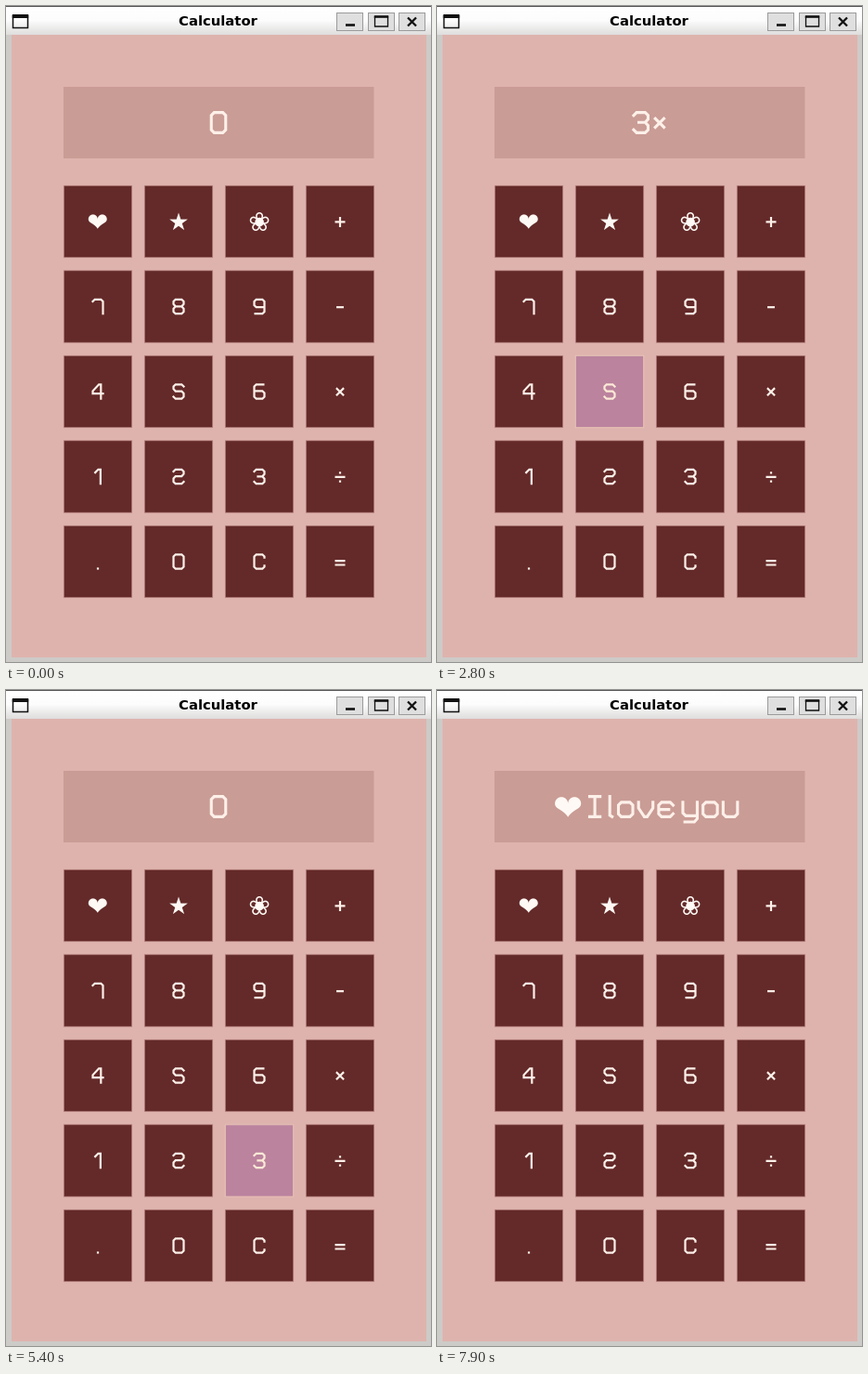
These frames come from a looping animation (458 by 706 pixels, 8000 ms). An HTML page:

```html
<!DOCTYPE html>
<html lang="en">
<head>
<meta charset="utf-8">
<title>Calculator</title>
<style>
  html, body { margin: 0; width: 100%; height: 100%; overflow: hidden; background: #deb3ae; }
  svg { display: block; width: 458px; height: 706px; }
  .title { font: bold 14.8px "DejaVu Sans", sans-serif; text-anchor: middle; }
  .symbol { font-family: "DejaVu Sans", sans-serif; fill: #fff9f5; }
  .glyph { fill: none; stroke: #fdf0e9; stroke-linecap: square; }
  .key rect { fill: #632a29; stroke: #b98480; stroke-width: .7; }
  .key.hover rect { fill: #bb839e; stroke: #e8c3b4; stroke-width: 1; }
  .key.hover .glyph { stroke: #fbe9d6; }
</style>
</head>
<body>
<svg id="stage" viewBox="0 0 458 706" xmlns="http://www.w3.org/2000/svg">
  <defs>
    <linearGradient id="bar" x2="0" y2="1">
      <stop offset="0" stop-color="#fff"/>
      <stop offset=".5" stop-color="#fcfcfc"/>
      <stop offset="1" stop-color="#dedddc"/>
    </linearGradient>
  </defs>
  <rect width="458" height="706" fill="#cdcbc8"/>
  <rect x="6" y="31" width="447" height="670" fill="#deb3ae"/>
  <rect width="458" height="31" fill="url(#bar)"/>
  <path d="M0 .5H458" stroke="#555"/>
  <text class="title" x="228.5" y="21">Calculator</text>
  <g fill="none" stroke="#111" stroke-width="1.5">
    <path d="M7.5 10V23.5H23.5V10"/>
    <path d="M6.8 11H24.2" stroke-width="4"/>
  </g>
  <g fill="#dfdfdf" stroke="#9b9b9b">
    <rect x="356.5" y="7.5" width="28" height="19"/>
    <rect x="390.5" y="7.5" width="28" height="19"/>
    <rect x="423.5" y="7.5" width="28" height="19"/>
  </g>
  <g fill="none" stroke="#111">
    <path d="M366 20.5H376" stroke-width="2.6"/>
    <path d="M397.5 11V22H411.5V11" stroke-width="1.3"/>
    <path d="M396.8 11.5H412.2" stroke-width="2.6"/>
    <path d="M433 12.5L442 21.5M442 12.5L433 21.5" stroke-width="2.3"/>
  </g>
  <rect x="62" y="87" width="334.5" height="77" fill="#c99c95"/>
  <g id="keys"></g>
  <g id="display"></g>
</svg>
<script>
const LOOP = 8000;
const BUTTON_UNIT = 2.2, DISPLAY_UNIT = 3.1, SPACE = 1.4;
const HEART = '❤', MESSAGE = HEART + ' I love you';

// Strokes on a grid eight units tall: [width, path]
const LOWER_O = 'M1.5 2.5H4.5L5.5 3.5V6.5L4.5 7.5H1.5L.5 6.5V3.5Z';
const GLYPHS = {
  0: [6, 'M1.5 .5H4.5L5.5 1.5V6.5L4.5 7.5H1.5L.5 6.5V1.5Z'],
  1: [3.6, 'M.5 2L2 .5H3.1V7.5'],
  2: [6, 'M.5 1.5L1.5 .5H4.5L5.5 1.5V2.7L4.5 3.8H1.5L.5 4.9V6.5L1.5 7.5H4.5L5.5 6.5'],
  3: [6, 'M.5 1.5L1.5 .5H4.5L5.5 1.5V2.8L4.5 3.9H2.3M4.5 3.9L5.5 5V6.5L4.5 7.5H1.5L.5 6.5'],
  4: [6, 'M4.5 7.5V.5H3.5L.5 3.7V5H5.5'],
  5: [6, 'M5.5 1.5L4.5 .5H1.5L.5 1.5V2.7L1.5 3.8H4.5L5.5 4.9V6.5L4.5 7.5H1.5L.5 6.5'],
  6: [6, 'M5 .5H1.5L.5 1.5V6.5L1.5 7.5H4.5L5.5 6.5V4.7L4.5 3.7H.5'],
  7: [6, 'M.5 1.5L1.5 .5H4.5L5.5 1.5V7.5'],
  8: [6, 'M1.5 .5H4.5L5.5 1.5V2.8L4.5 3.9H1.5L.5 2.8V1.5ZM1.5 3.9L.5 5V6.5L1.5 7.5H4.5L5.5 6.5V5L4.5 3.9'],
  9: [6, 'M5.5 4.3H1.5L.5 3.3V1.5L1.5 .5H4.5L5.5 1.5V6.5L4.5 7.5H1'],
  C: [6, 'M5.5 2V1.5L4.5 .5H1.5L.5 1.5V6.5L1.5 7.5H4.5L5.5 6.5V6'],
  '.': [1, 'M.5 7.4h.01'],
  '+': [5, 'M.5 4.2H4.5M2.5 2.2V6.2'],
  '-': [3.6, 'M.5 4.3H3.1'],
  '×': [5, 'M1 2.6L4 5.6M4 2.6L1 5.6'],
  '÷': [5, 'M.5 4.2H4.5M2.5 2.1h.01M2.5 6.3h.01'],
  '=': [5, 'M.5 3.6H4.5M.5 5.6H4.5'],
  I: [4.6, 'M.5 .5H4.1M2.3 .5V7.5M.5 7.5H4.1'],
  l: [2, 'M.5 .5V7L1.3 7.5'],
  o: [6, LOWER_O],
  v: [6, 'M.5 2.5V4.5L2.5 7.5H3.5L5.5 4.5V2.5'],
  e: [6, 'M5.5 3.5L4.5 2.5H1.5L.5 3.5V6.5L1.5 7.5H4.5L5.5 6.5M1 5H4'],
  y: [6, 'M.5 2.5V6.2L1.5 7.2H5.5M5.5 2.5V8.2L4.5 9.3H1.2'],
  u: [6, 'M.5 2.5V6.5L1.5 7.5H4.5L5.5 6.5V2.5']
};
const SYMBOL_WIDTH = { [HEART]: 9.2, '★': 9.1, '❀': 9.5 };

const ROWS = [[HEART, '★', '❀', '+'], '789-', '456×', '123÷', '.0C='];

// [time, value] pairs; each value holds until the next
const HOVERS = [
  [0, ''], [800, '0'], [900, '2'], [1200, '3'], [2050, '6'], [2200, '×'],
  [2600, '6'], [2750, '5'], [2900, '4'], [3400, '2'], [3500, 'C'], [3600, '='],
  [4800, 'C'], [5400, '3'], [5500, '6'], [5650, '5'], [5750, '8'], [5850, '7'],
  [5950, HEART], [7000, '']
];
const READINGS = [
  [0, '0'], [1600, '3'], [2400, '3×'], [3100, '3×4'], [4100, '12'], [5100, '0']
];
const TYPING_START = 6600, TYPING_STEP = 100;

const pen = document.createElement('canvas').getContext('2d');

function make(tag, attributes, parent) {
  const node = document.createElementNS('http://www.w3.org/2000/svg', tag);
  for (const name in attributes) node.setAttribute(name, attributes[name]);
  parent.append(node);
  return node;
}

// Picks the font size that gives the ink its width, and centres the ink
function drawSymbol(parent, char, cx, cy, width) {
  pen.font = '100px "DejaVu Sans", sans-serif';
  const ink = pen.measureText(char);
  const left = ink.actualBoundingBoxLeft, right = ink.actualBoundingBoxRight;
  const up = ink.actualBoundingBoxAscent, down = ink.actualBoundingBoxDescent;
  const scale = width / (left + right);
  make('text', {
    class: 'symbol',
    'font-size': 100 * scale,
    x: cx - (right - left) / 2 * scale,
    y: cy + (up - down) / 2 * scale
  }, parent).textContent = char;
}

const widthOf = char => SYMBOL_WIDTH[char] || GLYPHS[char][0];

function drawText(parent, text, cx, cy, unit) {
  const chars = [...text.trim()];
  const total = chars.reduce((sum, c) => sum + (c === ' ' ? SPACE : widthOf(c) + 1), -1);
  let x = cx - total * unit / 2;
  for (const char of chars) {
    if (char === ' ') {
      x += SPACE * unit;
      continue;
    }
    const width = widthOf(char);
    if (SYMBOL_WIDTH[char]) {
      drawSymbol(parent, char, x + width * unit / 2, cy, width * unit);
    } else {
      make('path', {
        class: 'glyph',
        d: GLYPHS[char][1],
        transform: `translate(${x} ${cy - 4 * unit}) scale(${unit})`
      }, parent);
    }
    x += (width + 1) * unit;
  }
}

const keys = {};
ROWS.forEach((row, r) => [...row].forEach((label, c) => {
  const x = 62 + 87 * c, y = 193 + 91.5 * r;
  const key = make('g', { class: 'key', 'aria-label': label }, document.getElementById('keys'));
  make('rect', { x: x + .3, y: y + .3, width: 73.4, height: 77.4 }, key);
  drawText(key, label, x + 37, y + 39, BUTTON_UNIT);
  keys[label] = key;
}));

const valueAt = (steps, t) => steps.filter(([start]) => start <= t).pop()[1];

const display = document.getElementById('display');
let shown = null;

function render(t) {
  const hovered = valueAt(HOVERS, t);
  for (const label in keys) keys[label].classList.toggle('hover', label === hovered);

  const typed = Math.floor((t - TYPING_START) / TYPING_STEP);
  const reading = typed > 0 ? MESSAGE.slice(0, typed) : valueAt(READINGS, t);
  if (reading === shown) return;
  shown = reading;
  display.replaceChildren();
  display.setAttribute('aria-label', reading);
  drawText(display, reading, typed > 0 ? 226.2 : 229, 125.5, DISPLAY_UNIT);
}

const start = performance.now();
function tick() {
  render((performance.now() - start) % LOOP);
  requestAnimationFrame(tick);
}
tick();
</script>
</body>
</html>
```
